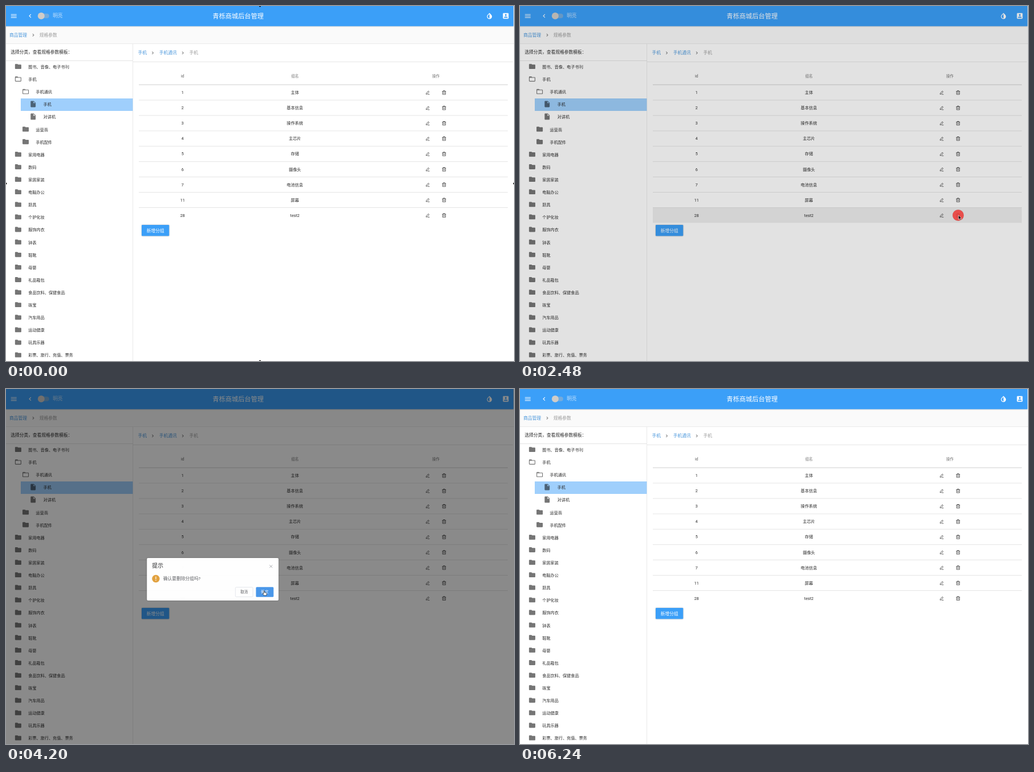
An HTML page that plays this animation: 895 px wide and 626 px high, repeating every 8100 ms.

```html
<!DOCTYPE html>
<html lang="zh-CN">
<head>
<meta charset="utf-8">
<style>
html, body { margin: 0; width: 100%; height: 100%; overflow: hidden; background: #fff; }
svg { display: block; width: 895px; height: 626px; font-family: Roboto, "Noto Sans CJK SC", "Noto Sans CJK", sans-serif; }
.raised { filter: drop-shadow(0 .8px .8px rgba(0,0,0,.3)); }
.line { fill: none; stroke: #333; stroke-width: .75; }
</style>
</head>
<body>
<svg id="stage" viewBox="0 0 895 626"></svg>
<script>
const LOOP = 8100, BLUE = '#3b9ff8', LINK = '#4a97dc', GREY = '#9b9b9b', ICON = '#757575';

// Icon paths on a 24-unit grid
const icons = {
  menu: 'M3 18h18v-2H3zM3 13h18v-2H3zM3 6v2h18V6z',
  left: 'M15.4 7.4L14 6l-6 6 6 6 1.4-1.4L10.8 12z',
  right: 'M10 6L8.6 7.4l4.6 4.6-4.6 4.6L10 18l6-6z',
  folder: 'M10 4H4c-1.1 0-2 .9-2 2v12c0 1.1.9 2 2 2h16c1.1 0 2-.9 2-2V8c0-1.1-.9-2-2-2h-8z',
  open: 'M20 6h-8l-2-2H4c-1.1 0-2 .9-2 2v12c0 1.1.9 2 2 2h16c1.1 0 2-.9 2-2V8c0-1.1-.9-2-2-2zm0 12H4V8h16z',
  file: 'M6 2c-1.1 0-2 .9-2 2v16c0 1.1.9 2 2 2h12c1.1 0 2-.9 2-2V8l-6-6zm7 7V3.5L18.5 9z',
  invert: 'M17.7 7.9L12 2.3 6.3 7.9a8 8 0 1 0 11.4 0zM12 19.6a6 6 0 0 1-4.2-10.2L12 5.1z',
  account: 'M5 3h14a2 2 0 0 1 2 2v14a2 2 0 0 1-2 2H5a2 2 0 0 1-2-2V5a2 2 0 0 1 2-2zM15 9a3 3 0 1 0-6 0 3 3 0 1 0 6 0zM6 17v1h12v-1c0-2-4-3.1-6-3.1S6 15 6 17z'
};
const EDIT = 'M-2.9 2.9L-2.5 1 1-2.9 2.5-1.5-1 2.5zM-.3 3.1H3.3';
const TRASH = 'M-3.4-2.2H3.4M-1.3-2.2V-3.4H1.3V-2.2M-2.6-2.2V3.2H2.6V-2.2M-.9-.6V1.7M.9-.6V1.7';

const icon = (name, x, y, fill, size = 13.27) =>
  `<path fill="${fill}" fill-rule="evenodd" d="${icons[name]}" transform="translate(${x - size / 2} ${y - size / 2}) scale(${size / 24})"/>`;
const text = (s, x, y, size, fill = '#2b2b2b', extra = '') =>
  `<text x="${x}" y="${y + size * .37}" font-size="${size}" fill="${fill}" ${extra}>${s}</text>`;
const mid = (s, x, y, size, fill, extra = '') => text(s, x, y, size, fill, 'text-anchor="middle" ' + extra);
const rect = (x, y, w, h, fill, extra = '') =>
  `<rect x="${x}" y="${y}" width="${w}" height="${h}" fill="${fill}" ${extra}/>`;
const circle = (x, y, r, fill, extra = '') => `<circle cx="${x}" cy="${y}" r="${r}" fill="${fill}" ${extra}/>`;
const stroke = (d, x, y, extra = '') => `<path class="line" d="${d}" transform="translate(${x} ${y})" ${extra}/>`;

function header() {
  return rect(0, 36, 895, 30.5, '#fafafa') + rect(0, 66, 895, .8, '#e8e8e8')
    + rect(-4, -4, 898, 39.6, BLUE, 'class="raised"')
    + icon('menu', 13.7, 17.7, '#fff') + icon('left', 42.5, 17.5, '#fff')
    + rect(58, 13.6, 18, 7.8, '#73abdd', 'rx="3.9"') + circle(62, 17.4, 6, '#d0ccc8')
    + text('明亮', 82.2, 17, 8.85, '#c5e1fb')
    + mid('青栎商城后台管理', 409, 17.8, 11.25, '#fff', 'font-weight="500"')
    + icon('invert', 851.8, 17.7, '#fff') + icon('account', 880.5, 17.5, '#fff')
    + text('商品管理', 6, 51, 7.75, LINK) + icon('right', 48, 51.2, '#666', 10)
    + text('规格参数', 59, 51, 7.75, GREY);
}

function sidebar() {
  // Leading digit is the depth; "+" marks an open folder, "-" a file
  const tree = '0图书、音像、电子书刊 0+手机 1+手机通讯 2-手机 2-对讲机 1运营商 1手机配件 0家用电器 0数码 0家居家装 0电脑办公 0厨具 0个护化妆 0服饰内衣 0钟表 0鞋靴 0母婴 0礼品箱包 0食品饮料、保健食品 0珠宝 0汽车用品 0运动健康 0玩具乐器 0彩票、旅行、充值、票务';
  let out = text('选择分类，查看规格参数模板：', 8.2, 81.3, 7.75)
    + rect(0, 96.2, 223.5, .8, '#dedede') + rect(223.2, 66.5, .8, 560, '#e4e4e4')
    + rect(26, 163, 197.4, 22, '#9fcffc');
  tree.split(' ').forEach((item, i) => {
    const depth = +item[0], kind = { '+': 'open', '-': 'file' }[item[1]] || 'folder';
    const y = 107.3 + i * 22.11;
    out += icon(kind, 21.4 + depth * 13.2, y - .7, i == 3 ? '#4b6277' : ICON)
      + text(item.replace(/^\d[+-]?/, ''), 39.2 + depth * 13.3, y, 7.19);
  });
  return out;
}

function table() {
  const rows = '1主体 2基本信息 3操作系统 4主芯片 5存储 6摄像头 7电池信息 11屏幕 28test2'.split(' ');
  let out = text('手机', 232.4, 82.6, 7.75, LINK) + icon('right', 258.5, 82.8, '#666', 10)
    + text('手机通讯', 269.9, 82.6, 7.75, LINK) + icon('right', 311.5, 82.8, '#666', 10)
    + text('手机', 323, 82.6, 7.75, GREY) + rect(224, 98, 669, .8, '#e2e2e2')
    + rect(234, 355.6, 650, 26.8, '#eee', 'id="hover"');
  [['id', 311], ['组名', 509], ['操作', 757.3]].forEach(([s, x]) =>
    out += mid(s, x, 123.3, 6.64, '#777', 'font-weight="500"'));
  rows.forEach((row, i) => {
    const y = 152.5 + i * 27.07, [, id, name] = row.match(/^(\d+)(.*)/);
    out += rect(234, y - 14, 650, .8, i ? '#dedede' : '#c4c4c4')
      + mid(id, 311, y, 7.19) + mid(name, 509, y, 7.19)
      + stroke(EDIT, 743, y + .2) + stroke(TRASH, 771.8, y + .2);
  });
  return out + circle(772, 369, 10, '#000', 'id="halo"')
    + rect(239, 386, 48.4, 19.4, BLUE, 'rx="1.2" class="raised"')
    + mid('新增分组', 263.2, 395.7, 7.75, '#fff', 'font-weight="500"');
}

function dialog() {
  return '<g id="dialog">' + rect(248.2, 298, 232, 75, '#fff', 'rx="2" class="raised"')
    + text('提示', 257.2, 311.8, 9.95, '#303133')
    + stroke('M-2.5-2.5L2.5 2.5M-2.5 2.5L2.5-2.5', 466.8, 312.8, 'style="stroke:#909399"')
    + circle(264, 334.5, 6.7, '#e3a340')
    + rect(263.4, 330.5, 1.2, 5.2, '#fff', 'rx=".6"') + circle(264, 337.6, .8, '#fff')
    + text('确认要删除分组吗?', 277, 334.5, 7.75, '#606266')
    + rect(404.2, 349.6, 30.8, 17, '#fff', 'rx="1.6" stroke="#dcdfe6" stroke-width=".7"')
    + mid('取消', 419.6, 358, 6.64, '#606266')
    + rect(440.4, 349.2, 31, 17.6, '#79b8fa', 'rx="1.6" id="confirm"')
    + mid('确定', 455.9, 358, 6.64, '#fff') + '</g>';
}

const marks = '<g id="marks">' + [[447.5, 0], [447.5, 626], [0, 313], [895, 313]]
  .map(([x, y]) => circle(x, y, 1.5, '#000')).join('') + '</g>';
const cursor = '<g id="cursor" stroke-width=".6" stroke-linejoin="round">'
  + '<path id="arrow" stroke="#fff" d="M0 0V7.4L1.7 5.8 2.8 8.4 4.2 7.8 3.1 5.3H5.4z"/>'
  + '<path id="hand" fill="#fff" stroke="#000" d="M-.9 5V.4Q-.2-.6.5.4V3L3.6 3.7Q4.6 4 4.4 5.2L3.7 8.2H-.4L-2.8 5.2Q-2.7 4.2-1.9 4.4z"/></g>';

stage.innerHTML = header() + sidebar() + table() + rect(0, 0, 895, 626, '#000', 'id="dim"')
  + circle(772, 369, 0, '#f4403c', 'id="press"') + dialog() + marks + cursor;
const el = id => document.getElementById(id);
const set = (id, name, value) => el(id).setAttribute(name, value);
const show = (id, on) => set(id, 'opacity', +on);

const ramp = (t, from, to) => Math.min(1, Math.max(0, (t - from) / (to - from)));
const ease = (t, from, to) => 1 - (1 - ramp(t, from, to)) ** 3;

// Each leg glides to x, y and bows out by bx, by on the way
const legs = [
  { from: 320, to: 400, x: 749, y: 485 },
  { from: 640, to: 1400, x: 779, y: 370, bx: 35 },
  { from: 1460, to: 1980, x: 772.5, y: 369 },
  { from: 2625, to: 2980, x: 455, y: 355.8, by: 55 },
  { from: 5660, to: 5900, x: 600, y: 410 },
  { from: 6040, to: 6240, x: 383, y: 618 }
];
function pointer(t) {
  let x = 614, y = 535;
  for (const { from, to, bx = 0, by = 0, ...end } of legs) {
    const p = ramp(t, from, to), bow = Math.sin(Math.PI * p);
    x += (end.x - x) * p + bx * bow;
    y += (end.y - y) * p + by * bow;
  }
  return `translate(${x} ${y})`;
}

function draw(t) {
  if (t > 2540 && t < 2660) t = 2540; // the picture pauses here
  const shut = ramp(t, 4200, 4360);
  const shown = ease(t, 2490, 2690) * (1 - shut);
  const hand = t >= 2980 && t < 4360;
  show('marks', t < 80);
  show('hover', t >= 4360 && t < 5680 ? .3 : ease(t, 1300, 1500) - ease(t, 2480, 2740));
  show('halo', .22 * (ease(t, 1460, 1660) - ease(t, 2740, 2980)));
  set('press', 'r', 10 * ramp(t, 2280, 2400) - 5.5 * ease(t, 2480, 2570));
  show('press', .85 * (1 - ramp(t, 2740, 2860)));
  show('dim', .46 * ease(t, 2465, 2645) * (1 - shut));
  show('dialog', shown);
  set('dialog', 'transform', `translate(0 ${-10 * (1 - shown)})`);
  set('confirm', 'fill', t >= 4060 ? '#4a98ea' : '#79b8fa');
  show('cursor', t >= 320 && t < 6240);
  set('cursor', 'transform', pointer(t));
  show('arrow', !hand);
  show('hand', hand);
}

const start = performance.now();
function tick(now) {
  draw(Math.max(0, now - start) % LOOP);
  requestAnimationFrame(tick);
}
tick(start);
</script>
</body>
</html>
```
